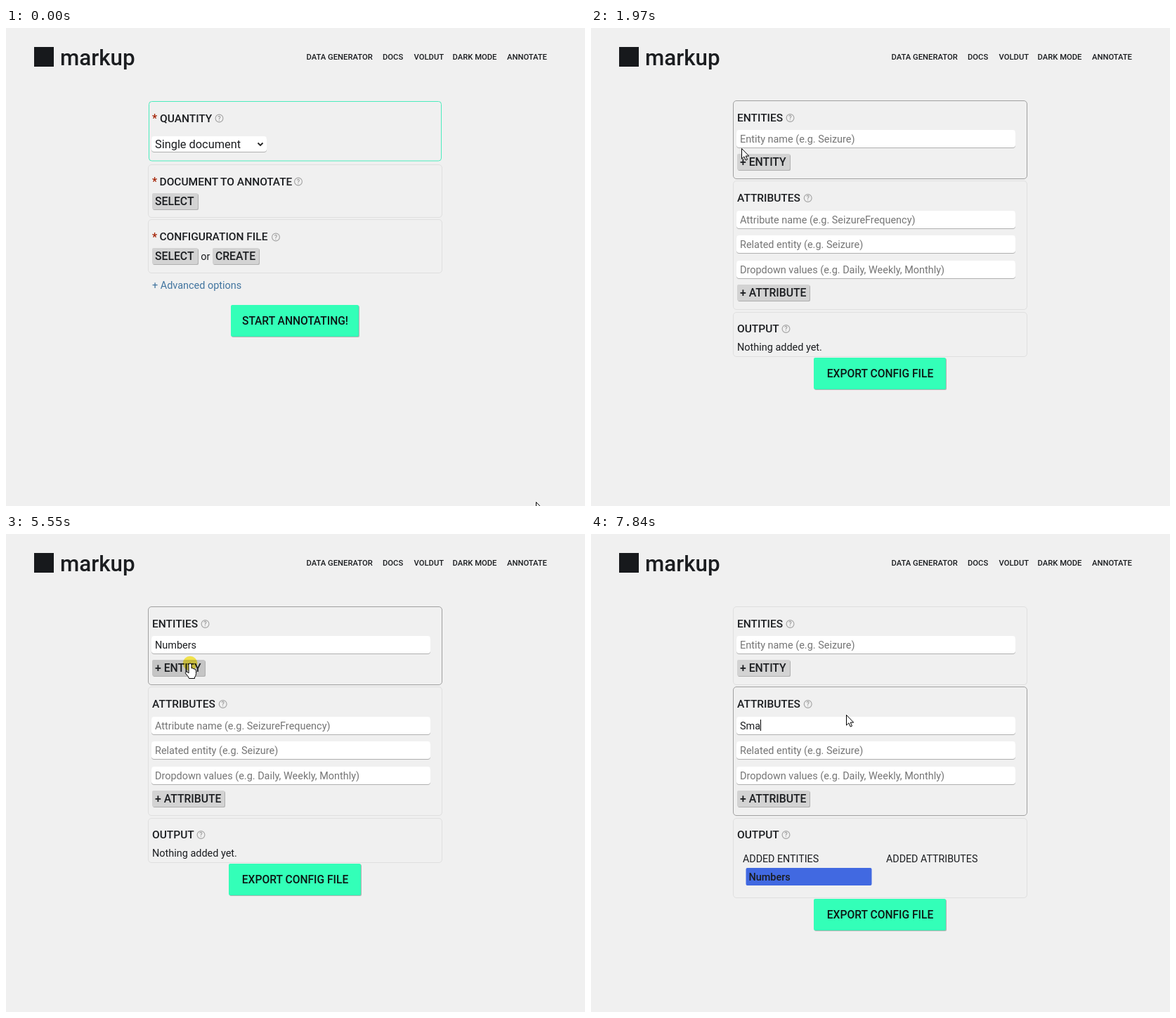
Animation, 824 px wide and 680 px high, one loop 8000 ms. Source, as an HTML page:

```html
<!DOCTYPE html>
<html lang="en">
<head>
<meta charset="utf-8">
<title>Annotation setup</title>
<style>
  html, body { margin: 0; width: 100%; height: 100%; overflow: hidden; background: #f0f0f0; }
  svg { display: block; }
  text { font: 400 14.45px Roboto, sans-serif; fill: #1b1d20; white-space: pre; }
  .nav { font-size: 11.25px; font-weight: 500; }
  .brand { font-size: 31.3px; font-weight: 500; }
  .head { font-size: 15.5px; font-weight: 500; }
  .label { font-size: 15.75px; font-weight: 500; }
  .big { font-size: 15.6px; font-weight: 500; fill: #0c1512; text-anchor: middle; }
  .choice { font-size: 16.35px; }
  .sub { font-size: 14.25px; }
  .tag { font-weight: 500; }
  .star { font-size: 16px; font-weight: 500; fill: #a32000; }
  .link { fill: #41749f; }
  .hint { fill: #757575; }
  .help circle { fill: none; stroke: #a2a2a2; stroke-width: 1.1; }
  .help text { font-size: 9px; font-weight: 500; fill: #999; text-anchor: middle; }
  .card { fill: none; stroke: #dfdfdf; }
  .card.hover { stroke: #a0a0a0; }
  .card.done { stroke: #4becbd; }
  .btn { fill: #d3d3d3; }
  .btn.hover { fill: #c5c5c5; }
  .go { fill: #33ffb8; }
  .go.hover { fill: #2df0ac; }
  .shade { fill: #b0b0b0; }
  .field { fill: #fff; }
  .off { visibility: hidden; }
  #cursor path { fill: #fff; stroke: #000; stroke-linejoin: round; }
  #cursor .beam { fill: none; }
  #ring { fill: #fff050; mix-blend-mode: multiply; }
</style>
</head>
<body>
<svg id="stage" width="824" height="680" viewBox="0 0 824 680"></svg>
<script>
const LOOP = 8000;
const stage = document.getElementById('stage');

const text = (x, y, str, cls = '') => `<text x="${x}" y="${y}" class="${cls}">${str}</text>`;
const rect = (x, y, w, h, r, cls, extra = '') =>
  `<rect x="${x}" y="${y}" width="${w}" height="${h}" rx="${r}" class="${cls}" ${extra}/>`;
const card = (y, h, extra) => rect(202.5, y, 418, h, 4.5, 'card', extra);
const heading = (x, y, str) => text(x, y, str, 'head');
const star = y => text(208, y, '*', 'star');
const help = (x, y) => `<g class="help"><circle cx="${x}" cy="${y}" r="5.4"/>${text(x, y + 3.3, '?')}</g>`;
// A face with a one pixel shade on its right and lower edges
const raised = (x, y, w, h, cls) =>
  rect(x + 1, y + 1, w - 1, h - 1, 2, 'shade') + rect(x, y, w - 1, h - 1, 2, cls);
const button = (x, y, w, str) => raised(x, y, w, 24, 'btn') + text(x + 4, y + 16.8, str, 'label');
const bigButton = (x, y, w, str) => raised(x, y, w, 46, 'go') + text(x + w / 2, y + 27.8, str, 'big');
const fieldBox = (y, w, h) =>
  rect(207, y + 1, w, h - 1, 4, 'shade') + rect(207, y, w, h - 1, 4, 'field');
const field = (y, hint, id = '') =>
  fieldBox(y, 397, 26) + `<text id="${id}" x="212" y="${y + 17.5}" class="hint">${hint}</text>`;

const header =
  rect(40, 27, 28, 28, 0, '', 'fill="#17191c"') + text(77, 52.5, 'markup', 'brand') +
  [[427.5, 'DATA GENERATOR'], [536, 'DOCS'], [580.5, 'VOLDUT'], [635.5, 'DARK MODE'], [713, 'ANNOTATE']]
    .map(([x, s]) => text(x, 44.5, s, 'nav')).join('');

const setup =
  rect(203.5, 104.5, 416, 84.5, 4, 'card done') +
  star(134) + heading(219, 133.5, 'QUANTITY') + help(303.5, 128.5) +
  fieldBox(154, 164, 23) + text(212, 171, 'Single document', 'choice') +
  '<path d="M358.5 163.5l3.5 3.5 3.5-3.5" fill="none" stroke="#222" stroke-width="1.8"/>' +
  card(194.5, 75) + star(224) + heading(218.5, 223.5, 'DOCUMENT TO ANNOTATE') + help(416, 218.5) +
  button(208, 235, 66, 'SELECT') +
  card(272.5, 76) + star(302.5) + heading(218.5, 302, 'CONFIGURATION FILE') + help(384, 297.5) +
  button(208, 313, 66, 'SELECT') + text(277.3, 330, 'or') + button(294, 313, 67, 'CREATE') +
  text(208, 370.5, '+ Advanced options', 'link') +
  bigButton(320, 394, 183, 'START ANNOTATING!');

const config =
  card(103.5, 111) + heading(208, 132.7, 'ENTITIES') +
  field(145, 'Entity name (e.g. Seizure)', 'entity') + button(208, 179, 76, '+ ENTITY') +
  card(217.5, 183) + heading(208, 246.7, 'ATTRIBUTES') +
  field(260, 'Attribute name (e.g. SeizureFrequency)', 'attribute') +
  field(295, 'Related entity (e.g. Seizure)') +
  field(331, 'Dropdown values (e.g. Daily, Weekly, Monthly)') +
  button(208, 365, 104, '+ ATTRIBUTE') +
  card(404.5, 63, 'id="output"') + heading(208, 432.7, 'OUTPUT') +
  `<g id="help">${help(283.5, 128)}${help(308.7, 242)}${help(277.5, 428)}</g>` +
  `<g id="empty">${text(208, 458.8, 'Nothing added yet.')}</g>` +
  `<g id="added">${text(216, 467.3, 'ADDED ENTITIES', 'sub')}${text(420, 467.3, 'ADDED ATTRIBUTES', 'sub')}` +
  `${rect(220.5, 475, 179, 25, 2, '', 'fill="#4169e1"')}${text(224.5, 492.8, 'Numbers', 'tag')}</g>` +
  `<g id="export">${bigButton(317, 469, 189, 'EXPORT CONFIG FILE')}</g>` +
  '<rect id="caret" width="1" height="16"/>';

stage.innerHTML = `${header}<g id="setup">${setup}</g><g id="config">${config}</g>
  <circle id="ring" r="10.3"/>
  <g id="cursor">
    <path class="arrow" d="M.5.5v14.6l3.4-3.2 2.3 5.2 2.3-1-2.3-5h4.5z"/>
    <path class="hand" d="M-2 11.5V1q0-2 2-2t2 2v5q2-1 2.5.8 2-.8 2.3 1 1.7 0 1.7 1.6v4q0 3-2 5.6v1.5h-8q-1-3-4.5-6.5-1.5-2 .3-3 1.8-.3 3.7 2z"/>
    <path class="beam" d="M-3-7.5h2M1-7.5h2M0-7V7M-3 7.5h2M1 7.5h2"/>
  </g>`;

const $ = id => document.getElementById(id);
const show = (el, on) => el.classList.toggle('off', !on);
const between = (t, [a, b]) => t >= a && t < b;

// Hit areas, measured once
const zones = id => [...$(id).querySelectorAll('.card, .btn, .go, .field, .head')]
  .map(el => ({ el, box: el.getBBox(), type: el.classList[0] }));
const pages = { setup: zones('setup'), config: zones('config') };
const kinds = { btn: 'hand', go: 'hand', field: 'beam', head: 'beam', card: 'arrow' };
const pointers = [...$('cursor').children];

// Pointer path: time, x, y
const path = [
  [0, 754, 674], [20, 754, 674], [320, 570, 505], [560, 412, 388], [750, 336, 330], [1230, 336, 330],
  [1590, 228, 241], [1760, 200, 206], [1910, 209, 172], [1935, 209, 172], [2130, 281, 160],
  [2260, 269, 158], [2490, 269, 158], [2570, 308, 145.6], [4940, 308, 145.6], [5300, 262, 185],
  [5740, 262, 185], [6060, 306, 256], [6200, 307, 267], [6420, 307, 267], [6600, 363, 257], [LOOP, 363, 257]
];

const still = (a, b) => a[1] === b[1] && a[2] === b[2];
function slope(i, k) {
  const a = path[i - 1], p = path[i], b = path[i + 1];
  if (!a || !b || still(a, p) || still(p, b)) return 0;
  return (b[k] - a[k]) / (b[0] - a[0]);
}
function pointerAt(t) {
  const i = path.findIndex((p, n) => n + 1 < path.length && t < path[n + 1][0]);
  const a = path[i], b = path[i + 1], d = b[0] - a[0], u = (t - a[0]) / d, v = 1 - u;
  return [1, 2].map(k =>
    a[k] * v * v * (1 + 2 * u) + b[k] * u * u * (3 - 2 * u) +
    d * u * v * (slope(i, k) * v - slope(i + 1, k) * u));
}

const OPEN = 1220, ICONS = 1640, ADD = 5680;
const clicks = [[1110, 1200], [2270, 2360], [5550, 5670], [6170, 6260]];
const carets = {
  entity: [[2340, 2870], [3400, 4930], [5430, 5540]],
  attribute: [[6240, 6870], [7390, LOOP]]
};
const typed = {
  entity: { word: 'Numbers', keys: [3520, 3690, 3820, 4020, 4130, 4240, 4400], end: ADD },
  attribute: { word: 'Sma', keys: [7510, 7760, 7840], end: LOOP }
};
const hints = { entity: $('entity').textContent, attribute: $('attribute').textContent };

// Sets a field's text; returns whether its caret is lit
function fill(id, t) {
  const { word, keys, end } = typed[id];
  const value = t < end ? word.slice(0, keys.filter(k => t >= k).length) : '';
  const el = $(id);
  el.textContent = value || hints[id];
  el.classList.toggle('hint', !value);
  if (!carets[id].some(span => between(t, span))) return false;
  $('caret').setAttribute('x', 212 + Math.round(value ? el.getComputedTextLength() : 0));
  $('caret').setAttribute('y', id === 'entity' ? 150 : 264);
  return true;
}

function render(t) {
  const page = t < OPEN ? 'setup' : 'config', added = t >= ADD;
  show($('setup'), page === 'setup');
  show($('config'), page === 'config');
  show($('help'), t >= ICONS);
  show($('empty'), !added);
  show($('added'), added);
  $('output').setAttribute('height', added ? 113 : 63);
  $('export').setAttribute('transform', `translate(0 ${added ? 50 : 0})`);

  const first = fill('entity', t), second = fill('attribute', t);
  show($('caret'), first || second);

  const [x, y] = pointerAt(t);
  let kind = 'arrow';
  for (const { el, box, type } of pages[page]) {
    const hit = x >= box.x && x <= box.x + box.width && y >= box.y && y <= box.y + box.height;
    el.classList.toggle('hover', hit);
    if (hit) kind = kinds[type];
  }
  for (const p of pointers) show(p, p.classList[0] === kind);
  const snap = v => Math.round(v) + (kind === 'beam' ? .5 : 0);
  $('cursor').setAttribute('transform', `translate(${snap(x)} ${snap(y)})`);
  $('ring').setAttribute('cx', x);
  $('ring').setAttribute('cy', y - 1);
  show($('ring'), clicks.some(span => between(t, span)));
}

const start = performance.now();
function tick() {
  render((performance.now() - start) % LOOP);
  requestAnimationFrame(tick);
}
tick();
</script>
</body>
</html>
```
